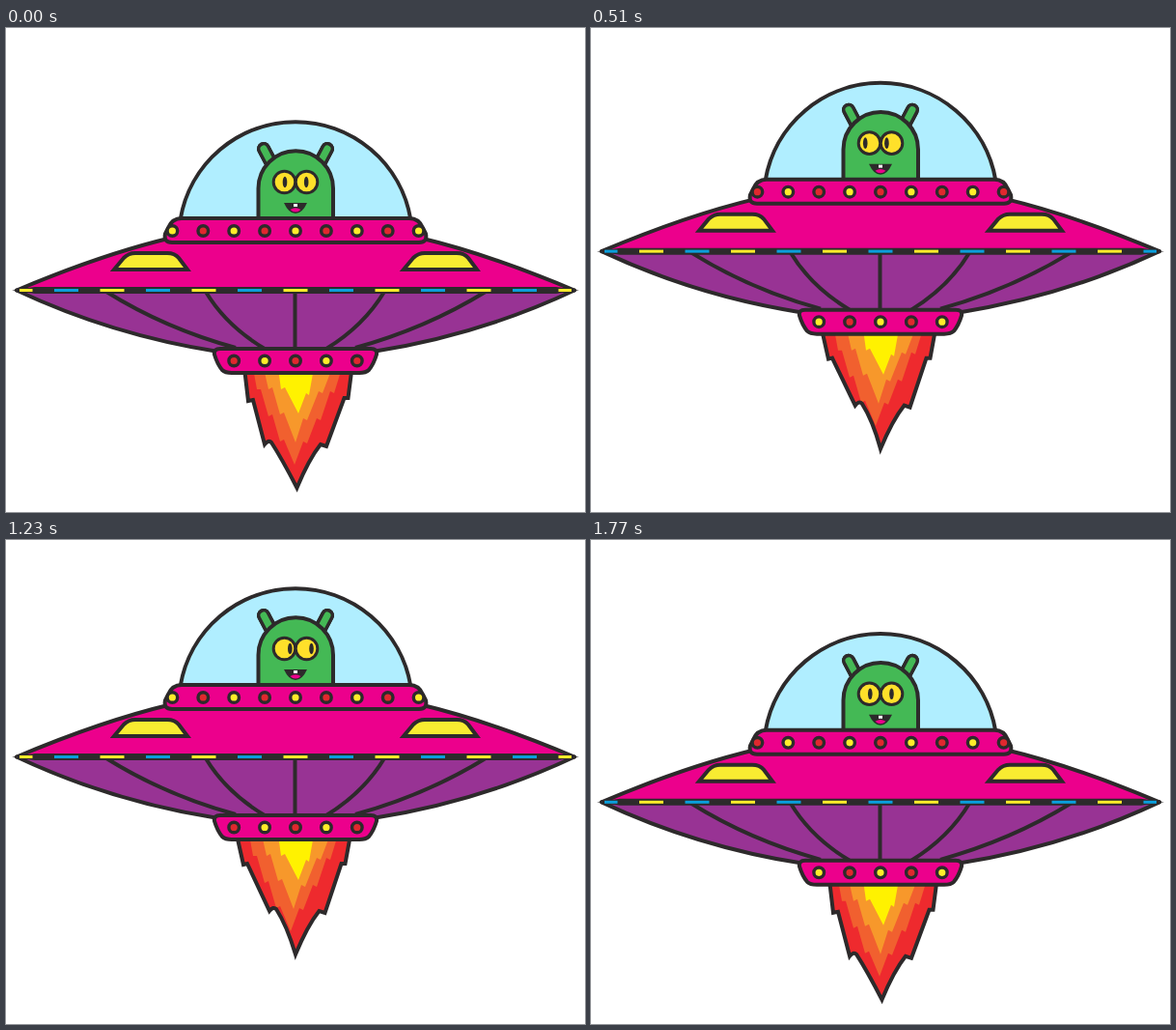
An HTML page for the animation above (1.8 s loop, 600x501 px).

```html
<!DOCTYPE html>
<html lang="en">
<head>
<meta charset="utf-8">
<title>Flying saucer</title>
<style>
html, body { margin: 0; width: 100%; height: 100%; overflow: hidden; background: #fff; }
svg { display: block; }
.line { stroke: #2d2a2b; stroke-width: 4; stroke-linejoin: round; }
.pink { fill: #ec008c; }
.dark { fill: #2d2a2b; }
</style>
</head>
<body>
<svg width="600" height="501" viewBox="0 0 600 501">
  <g id="ship">
    <g id="flame">
      <path id="red" fill="#ee2a2e"/>
      <path id="ember" fill="#f1602f" d="M256 352 260 374 264 374 272 402 276 400 284 428 288 426 299 452 308 428 312 430 322 404 326 406 336 376 340 378 348 352"/>
      <path id="orange" fill="#f7982b" d="M267 352 272 374 276 372 284 400 288 398 300 429 308 404 312 406 324 376 328 378 338 352"/>
      <path fill="#fff200" d="M282 352 285 374 289 372 303 399 311 378 314 380 319 352"/>
      <path id="edge" class="line" fill="none" style="stroke-linejoin:miter"/>
    </g>

    <path class="line" fill="#983394" d="M11 271.5Q110 318 220 335H380Q490 318 589 271.5Z"/>
    <path class="line" fill="none" d="M104 273Q165 311 238 331M207 273Q228 308 268 332M299.5 273V332M392 273Q371 308 332 332M497 273Q435 311 362 331"/>
    <path class="line pink" d="M222 332H378Q385 332 384 338Q381 348 376 354Q373 357 366 357H234Q227 357 224 354Q219 348 216 338Q215 332 222 332Z"/>

    <path class="line pink" d="M11 271.5Q100 234 172 217H428Q500 234 589 271.5Z"/>
    <path class="dark" d="M6 271.5 30 268H570L594 271.5 570 275H30Z"/>
    <g id="dashes"></g>
    <g class="line" fill="#f8ec31" style="stroke-linejoin:miter">
      <path id="pane" d="M112 250 122 238Q127 233 134 233H167Q175 233 179 238L188 250Z"/>
      <use href="#pane" x="300"/>
    </g>

    <path class="line" fill="#b0eeff" d="M180.7 198A121 121 0 0 1 419.3 198Z"/>
    <g stroke-linecap="round">
      <path id="horns" d="M267 125 277 144M333 125 323 144" stroke="#2d2a2b" stroke-width="14"/>
      <use href="#horns"/>
      <path d="M267 125 277 144M333 125 323 144" stroke="#44b955" stroke-width="7"/>
    </g>
    <path class="line" fill="#44b955" d="M261.5 198V166A38.5 38.5 0 0 1 339 166V198Z"/>
    <g class="line" fill="#ffe02a" style="stroke-width:3">
      <circle cx="288.5" cy="159.5" r="11.3"/>
      <circle cx="311.5" cy="159.5" r="11.3"/>
    </g>
    <g id="pupils" class="dark">
      <ellipse cx="289" cy="159.5" rx="2.3" ry="5.8"/>
      <ellipse cx="311.2" cy="159.5" rx="2.3" ry="5.8"/>
    </g>
    <path class="dark" d="M288 181H312Q307 192 300 192Q293 192 288 181Z"/>
    <path class="pink" d="M294.5 188Q300 184.500 305.500 188Q303 190.500 300 190.500Q297 190.500 294.500 188Z"/>
    <path fill="#fff" d="M298 182H302V185H298Z"/>

    <path class="line pink" d="M182 197H418Q428 197 432 207L435 213Q437 222 428 222H172Q163 222 165 213L168 207Q172 197 182 197Z"/>
    <g id="lamps" class="line" style="stroke-width:3.4"></g>
  </g>
</svg>
<script>
const LOOP = 1800, STEP = 30, BLINK = 150;
const YELLOW = '#ffec2a', RED = '#e0282e', BLUE = '#0a9fdc';
const $ = id => document.getElementById(id);
const blinkers = [];

function add(parent, tag, attrs) {
  const el = document.createElementNS('http://www.w3.org/2000/svg', tag);
  for (const k in attrs) el.setAttribute(k, attrs[k]);
  return $(parent).appendChild(el);
}

// Each light alternates between its two colours.
function blinker(el, first, second) {
  blinkers.push({ el, colors: [first, second] });
}

function lampRow(count, y, first, second) {
  for (let i = 0; i < count; i++) {
    const cx = 300 + (i - (count - 1) / 2) * 31.9;
    const el = add('lamps', 'circle', { cx, cy: y, r: 5.3 });
    i % 2 ? blinker(el, second, first) : blinker(el, first, second);
  }
}

lampRow(9, 210, YELLOW, RED);
lampRow(5, 344.5, RED, YELLOW);

for (let k = -6; k <= 6; k++) {
  const x = 300 + k * 47.5;
  const left = Math.max(x - 12.5, 14), right = Math.min(x + 12.5, 586);
  const el = add('dashes', 'rect', { x: left, y: 270, width: right - left, height: 3 });
  k % 2 ? blinker(el, BLUE, YELLOW) : blinker(el, YELLOW, BLUE);
}

const clamp = x => Math.min(1, Math.max(0, x));
const shift = (id, x, y = 0) => $(id).setAttribute('transform', `translate(${x} ${y})`);

// lean: 0 to 1, sway to the left; pinch: -1 to 1, spread of the lower notches
function flamePath(lean, pinch) {
  const n = 271 - 3 * pinch, r = -1.5 * lean, top = 383 - lean;
  return `M${247 - 8 * lean} 352L${251 - 5 * lean} ${386 - 3 * lean}` +
    `L${256 - 6 * lean} ${385 - 3 * lean}L${n} 431Q${n + 4} 426 ${n + 7} 429` +
    `Q${n + 18} 446 ${301.5 + r} 476Q${314 + r} 446 ${326 + r} 431` +
    `L${332 + r} 433L${350.5 + 2 * r} ${top}L${354.5 + 2 * r} ${top}L${358.5 + r} 352`;
}

// Pupils glide left, across to the right, then back to the middle.
function gaze(p) {
  return 5.6 * (p < 1 / 3 ? -3 * p : p < 2 / 3 ? 6 * p - 3 : 3 - 3 * p);
}

function draw(now) {
  const t = Math.floor(now % LOOP / STEP) * STEP;
  const p = t / LOOP, wave = Math.cos(2 * Math.PI * p);
  shift('ship', 0, -33.4 * (1 - wave));
  shift('pupils', gaze(p));

  const lean = clamp(0.5 - 2.5 * wave);
  const d = flamePath(lean, Math.cos(4 * Math.PI * p));
  $('red').setAttribute('d', d);
  $('edge').setAttribute('d', d);
  shift('ember', -4 * lean);
  shift('orange', -2 * lean);

  const phase = Math.floor(t / BLINK) % 2;
  for (const { el, colors } of blinkers) el.setAttribute('fill', colors[phase]);
}

function tick() {
  draw(performance.now());
  requestAnimationFrame(tick);
}
tick();
</script>
</body>
</html>
```
